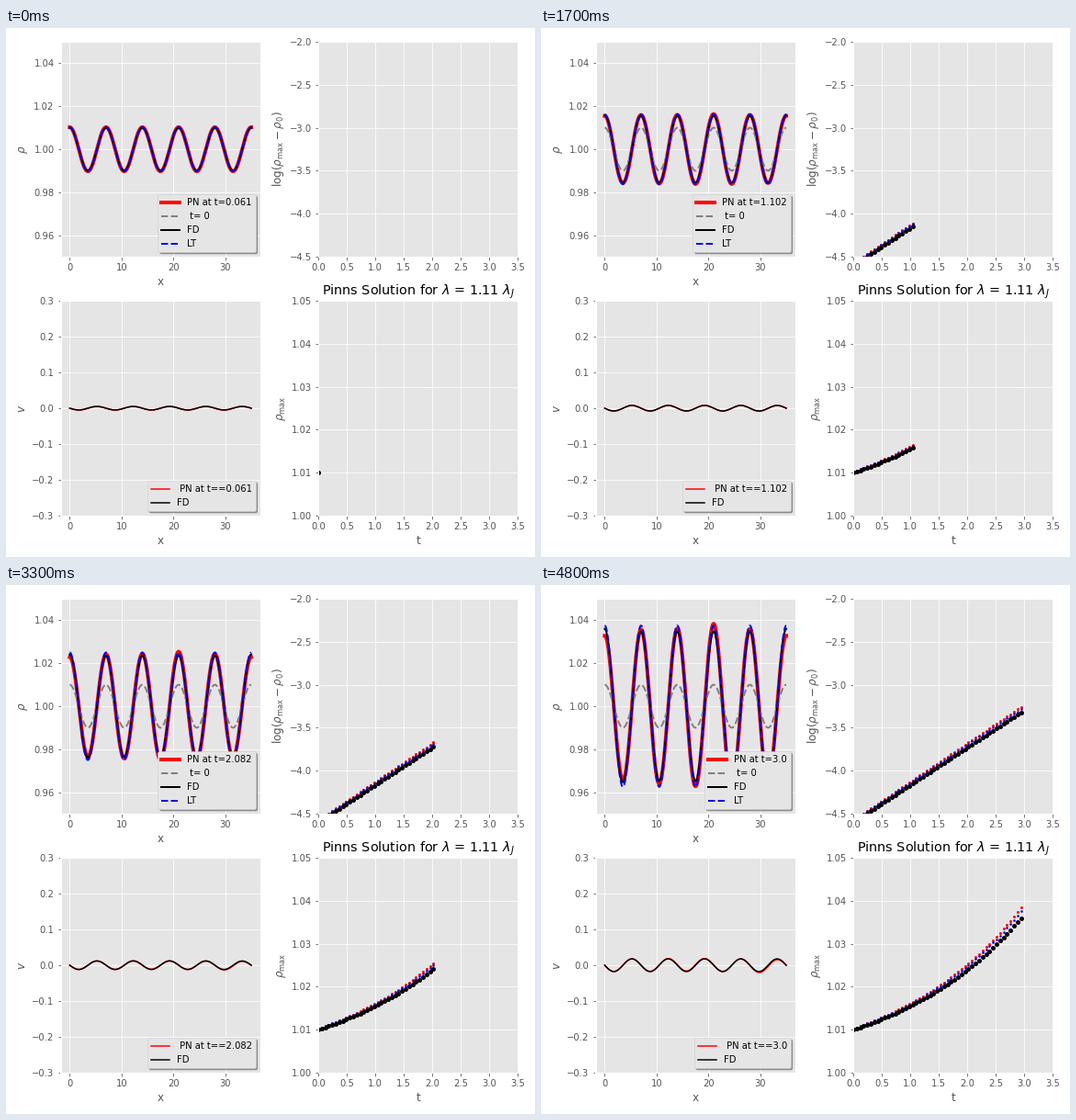
Recreate the animation shown at these times as a matplotlib script. Size 576 px wide and 576 px high, loop 4900 ms.

```python
import numpy as np
import matplotlib.pyplot as plt
from matplotlib.animation import FuncAnimation

plt.style.use("ggplot")

SIZE, DPI = 576, 72
FRAMES, INTERVAL = 49, 100
LAM = 7.0
K = 2 * np.pi / LAM
OMEGA = np.sqrt(1 - K**2)  # linear growth rate
AMP = 0.01

x = np.linspace(0, 5 * LAM, 701)
peaks = LAM * np.arange(6)
times = np.linspace(0, 3, FRAMES + 1)
starts, ends = times[:-1], times[1:]

# Relative amplitude drift along x for the network and finite-difference curves
pn_drift = np.interp(x, peaks, [-0.042, -0.016, -0.012, 0.0077, -0.014, -0.042])
fd_drift = np.interp(x, peaks, [0, -0.011, -0.011, -0.011, -0.011, 0])


def bump(center, width):
    return np.exp(-(((x - center) / width) ** 2))


pn_v_shift = 0.0015 * bump(16, 6) - 0.0034 * bump(31.2, 3)

lt_amp = AMP * np.exp(OMEGA * ends)
fd_amp = AMP * np.exp(OMEGA * starts) * (1 - 0.005 * starts)
pn_amp = lt_amp * (1 + 0.0077 * ends)

fig = plt.figure(figsize=(SIZE / DPI, SIZE / DPI), dpi=DPI)


def panel(left, top, xlim, ylim, xticks, yticks, xlabel, ylabel):
    ax = fig.add_axes([left / SIZE, 1 - (top + 234) / SIZE, 217.4 / SIZE, 234 / SIZE])
    ax.set(xlim=xlim, ylim=ylim, xticks=xticks, yticks=yticks,
           xlabel=xlabel, ylabel=ylabel)
    return ax


x_range, t_range = (-1.75, 36.75), (0, 3.5)
x_ticks, t_ticks = [0, 10, 20, 30], np.arange(0, 3.6, 0.5)

ax_rho = panel(59.5, 15, x_range, (0.95, 1.05), x_ticks,
               np.linspace(0.96, 1.04, 5), "x", r"$\rho$")
ax_log = panel(340, 15, t_range, (-4.5, -2), t_ticks,
               np.linspace(-4.5, -2, 6), "", r"$\log(\rho_{\rm max} - \rho_0)$")
ax_v = panel(59.5, 297, x_range, (-0.3, 0.3), x_ticks,
             np.linspace(-0.3, 0.3, 7), "x", r"$v$")
ax_max = panel(340, 297, t_range, (1, 1.05), t_ticks,
               np.linspace(1, 1.05, 6), "t", r"$\rho_{\rm max}$")
ax_max.set_title(r"Pinns Solution for $\lambda$ = 1.11 $\lambda_J$")

wave = np.cos(K * x)
rho_pn, = ax_rho.plot(x, wave, color="r", lw=4)
ax_rho.plot(x, 1 + AMP * wave, "--", color="gray", lw=2, label=" t= 0")
rho_fd, = ax_rho.plot(x, wave, color="k", lw=2, label="FD")
rho_lt, = ax_rho.plot(x, wave, "--", color="b", lw=2, label="LT")

v_pn, = ax_v.plot(x, wave, color="r", lw=1.5)
v_fd, = ax_v.plot(x, wave, color="k", lw=1.5, label="FD")


def dots(ax):
    styles = [("r", 3), ("b", 2.6), ("k", 5)]
    return [ax.plot([], [], "o", color=c, ms=s, mew=0)[0] for c, s in styles]


log_dots, max_dots = dots(ax_log), dots(ax_max)


def update(i):
    t = ends[i]
    rho_pn.set_ydata(1 + lt_amp[i] * (1 + t * pn_drift) * wave)
    rho_fd.set_ydata(1 + fd_amp[i] * (1 + t * fd_drift) * wave)
    rho_lt.set_ydata(1 + lt_amp[i] * wave)

    v = -fd_amp[i] * OMEGA / K * np.sin(K * x)
    v_fd.set_ydata(v)
    v_pn.set_ydata(v + pn_v_shift * (t / 3) ** 2)

    n = i + 1
    for amp, log_dot, max_dot in zip((pn_amp, lt_amp, fd_amp), log_dots, max_dots):
        log_dot.set_data(starts[:n], np.log(amp[:n]))
        max_dot.set_data(starts[:n], 1 + amp[:n])

    label = round(float(t), 3)
    rho_pn.set_label(f"PN at t={label}")
    v_pn.set_label(f" PN at t=={label}")
    for ax in (ax_rho, ax_v):
        ax.legend(loc="lower right", shadow=True)


anim = FuncAnimation(fig, update, frames=FRAMES, interval=INTERVAL,
                     repeat=True, repeat_delay=0)
plt.show()
```
